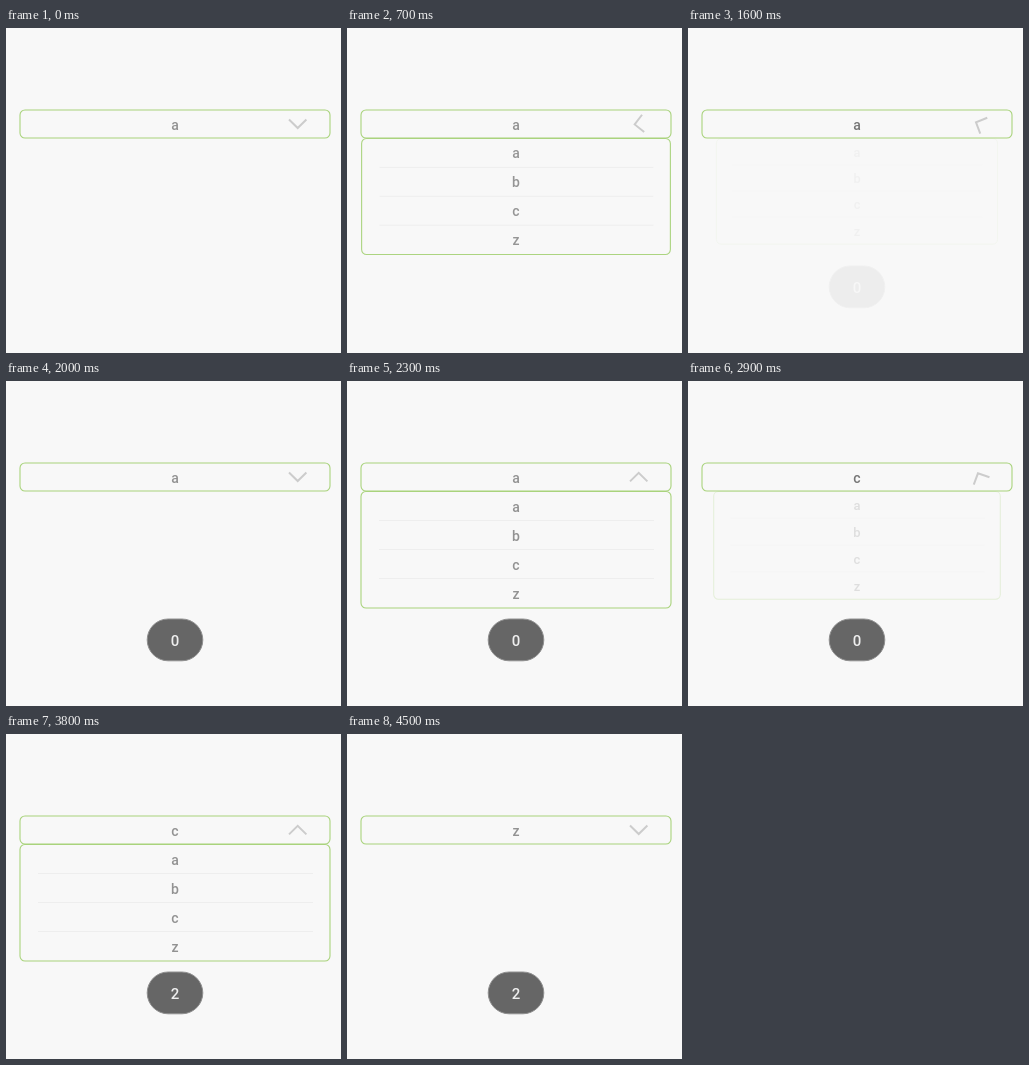
These frames come from a looping animation (335x325 px, 5300 ms). An HTML page:

```html
<!DOCTYPE html>
<html lang="en">
<head>
<meta charset="utf-8">
<title>Dropdown</title>
<style>
  html, body { margin: 0; width: 100%; height: 100%; overflow: hidden; background: #f8f8f8; }
  svg { display: block; width: 335px; height: 325px; }
  text { font: 500 14px Roboto, sans-serif; fill: #929292; text-anchor: middle; }
  .box { fill: #f8f8f8; stroke: #a9d37c; stroke-width: 1.1; }
  .divider { stroke: #eee; }
  #title.picked { fill: #757575; }
  #arrow { fill: none; stroke: #ccc; stroke-width: 2; }
  #toast rect { fill: #666; stroke: #909090; }
  #toast text { font-size: 15px; fill: #eee; }
</style>
</head>
<body>
<svg viewBox="0 0 335 325">
  <g id="list">
    <rect class="box" x="14" y="110.5" width="310" height="116.5" rx="5"/>
  </g>
  <rect class="box" x="14" y="82" width="310" height="28" rx="5"/>
  <text id="title" x="169" y="101.8">a</text>
  <path id="arrow" d="M283 91.5L291.7 100L300.4 91.5"/>
  <g id="toast">
    <rect x="141.2" y="238" width="55.6" height="41.8" rx="20.9"/>
    <text id="count" x="169" y="264.8">0</text>
  </g>
</svg>
<script>
const LOOP = 5300, TICK = 100, DURATION = 200;
const byId = id => document.getElementById(id);
const [list, title, arrow, toast, count] = ['list', 'title', 'arrow', 'toast', 'count'].map(byId);

// The list opens and closes in turn; closing shows the picked letter.
const toggles = [
  { start: 605 }, { start: 1517, pick: 'a' },
  { start: 2100 }, { start: 2851, pick: 'c' },
  { start: 3490 }, { start: 4205, pick: 'z' }
];
const toastStart = 1570, toastFade = 430, recount = 3550;

const clamp = x => Math.max(0, Math.min(1, x));
const easeInOut = x => (1 - Math.cos(Math.PI * x)) / 2;

[...'abcz'].forEach((letter, i) => {
  const y = 130.5 + 29.1 * i;
  const divider = i ? `<path class="divider" d="M32 ${110.5 + 29 * i}H307"/>` : '';
  list.insertAdjacentHTML('beforeend', `${divider}<text x="169" y="${y}">${letter}</text>`);
});

function draw(time) {
  const now = Math.floor(time / TICK) * TICK;
  const past = toggles.filter(toggle => toggle.start <= now);
  const last = past.at(-1);
  const picked = past.findLast(toggle => toggle.pick);
  const closing = !last || Boolean(last.pick);
  const progress = last ? clamp((now - last.start) / DURATION) : 1;

  const turn = easeInOut(progress);
  const rest = (1 - progress) ** 5;
  const shown = closing ? rest : 1 - rest;
  arrow.setAttribute('transform', `rotate(${180 * (closing ? 1 - turn : turn)} 291.7 95.95)`);
  list.setAttribute('transform', `translate(169 110.5) scale(${.9 + .1 * shown}) translate(-169 -110.5)`);
  list.setAttribute('opacity', last ? shown : 0);

  title.textContent = picked ? picked.pick : 'a';
  title.setAttribute('class', closing && progress < 1 ? 'picked' : '');

  toast.setAttribute('opacity', clamp((now - toastStart) / toastFade));
  count.textContent = now < recount ? '0' : '2';
}

const start = performance.now();
function tick() {
  draw((performance.now() - start) % LOOP);
  requestAnimationFrame(tick);
}
tick();
</script>
</body>
</html>
```
